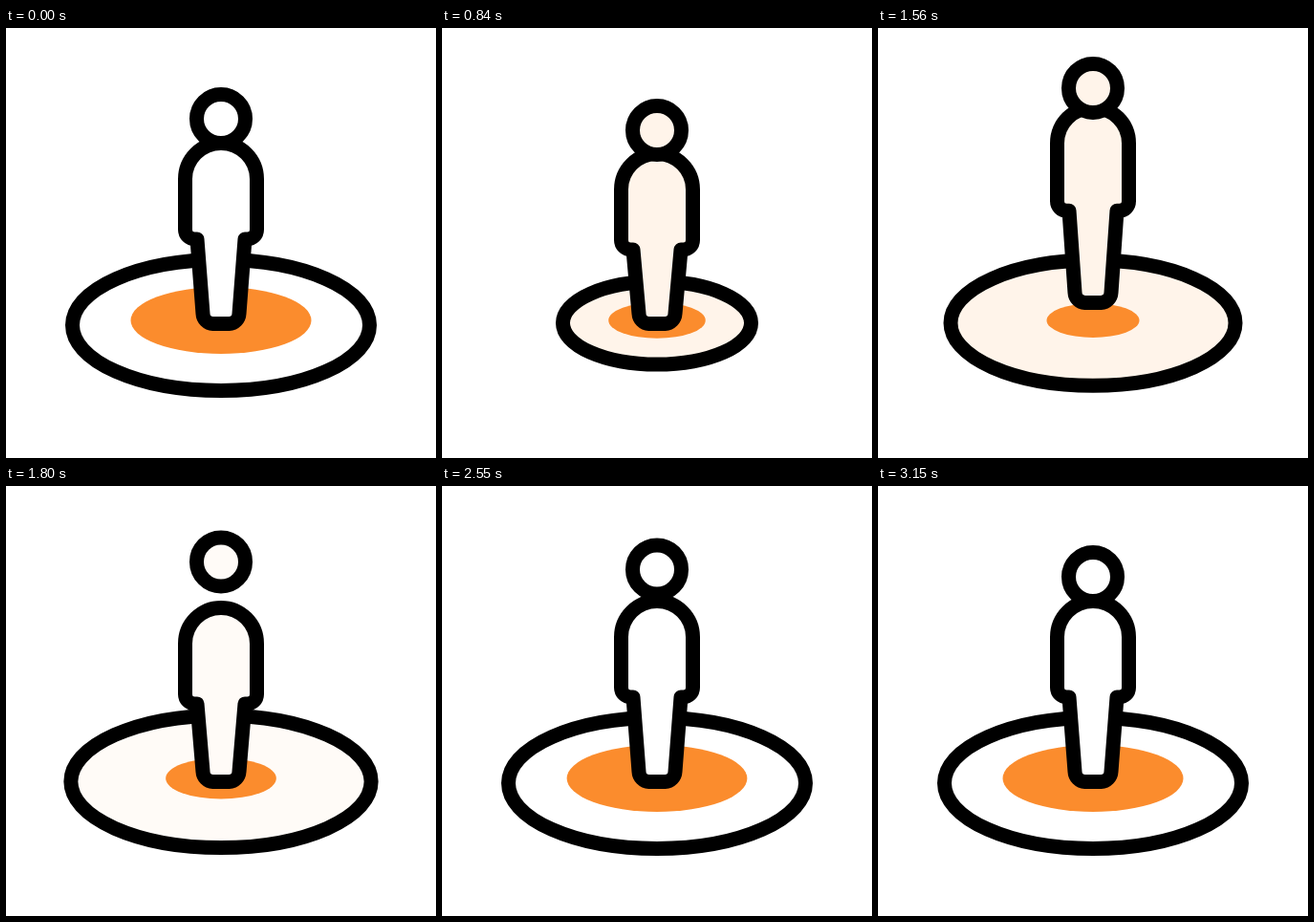
Animation of 450 by 450 pixels, one loop 4.5 s. Source, as an HTML page:

```html
<!DOCTYPE html>
<html lang="en">
<head>
<meta charset="utf-8">
<title>Standing figure</title>
<style>
  html, body { margin: 0; width: 100%; height: 100%; overflow: hidden; background: #fff; }
  svg { display: block; width: 100%; height: 100%; }
  .line { stroke: #000; stroke-width: 15; stroke-linejoin: round; }
</style>
</head>
<body>
<svg viewBox="0 0 450 450">
  <ellipse id="disc" class="line" cx="225"/>
  <ellipse id="spot" cx="225" cy="306" fill="#fb8c2d"/>
  <path id="body" class="line"/>
  <circle id="head" class="line" cx="225" r="25.5"/>
</svg>
<script>
const LOOP = 4500, STEP = 30;
const [disc, spot, body, head] = ['disc', 'spot', 'body', 'head'].map(id => document.getElementById(id));

const inOut = p => p < .5 ? 2 * p * p : 1 - 2 * (1 - p) ** 2;
const fall = p => p ** 4;
const fadeOut = p => 1 - (1 - p) ** 6;
const drift = p => p ** 1.15;

function set(el, attrs) {
  for (const name in attrs) el.setAttribute(name, attrs[name]);
}

// The hips carry the arms; shoulders follow and also stretch upwards in a jump.
function bodyPath(hipShift, footShift) {
  const shoulder = 158 + hipShift + Math.min(0, hipShift - footShift);
  const hip = 221 + hipShift, hand = hip - 10;
  const sole = 309.5 + footShift, ankle = sole - 10.5;
  return `M187.5 ${shoulder} A37.5 37.5 0 0 1 262.5 ${shoulder}
    V${hand} A10 10 0 0 1 252.5 ${hip} H250
    L244 ${ankle} A11 11 0 0 1 233.5 ${sole} H216.5 A11 11 0 0 1 206 ${ankle}
    L200 ${hip} H197.5 A10 10 0 0 1 187.5 ${hand} Z`;
}

function draw(now) {
  const t = Math.floor(now % LOOP / STEP) * STEP;
  // Progress from 0 to 1 between two times.
  const tween = (start, end, ease = inOut) =>
    ease(Math.min(1, Math.max(0, (t - start) / (end - start))));

  const rise = tween(840, 1210);
  const air = rise - tween(1200, 1740, fall);
  const nod = tween(125, 580) - rise;
  const crouch = tween(125, 770) - rise;
  const landing = tween(1700, 1810) - tween(1810, 2400);
  const hover = tween(1560, 1740) - tween(1740, 3150, drift);
  const sink = tween(150, 600) - tween(1650, 2050);
  const tint = tween(330, 900) - tween(1560, 3150, fadeOut);

  const fill = `rgb(255 ${255 - 11 * tint} ${255 - 21 * tint})`;
  const discRx = 155.5 - 88 * tween(135, 1350) + 105 * tween(1365, 1658) - 17 * tween(1658, 1840);
  const spotRx = 94.5 - 48 * (tween(130, 1030) - tween(1386, 2590));

  set(disc, { cy: 311 - 2.3 * sink, rx: discRx, ry: discRx * .4405, fill });
  set(spot, { rx: spotRx, ry: spotRx * .37 });
  set(body, { d: bodyPath(11 * crouch - 37 * air + 7 * landing, -27.5 * air), fill });
  set(head, { cy: 95 + 12 * nod - 40 * air - 16 * hover, fill });
}

function tick() {
  draw(performance.now());
  requestAnimationFrame(tick);
}
tick();
</script>
</body>
</html>
```
